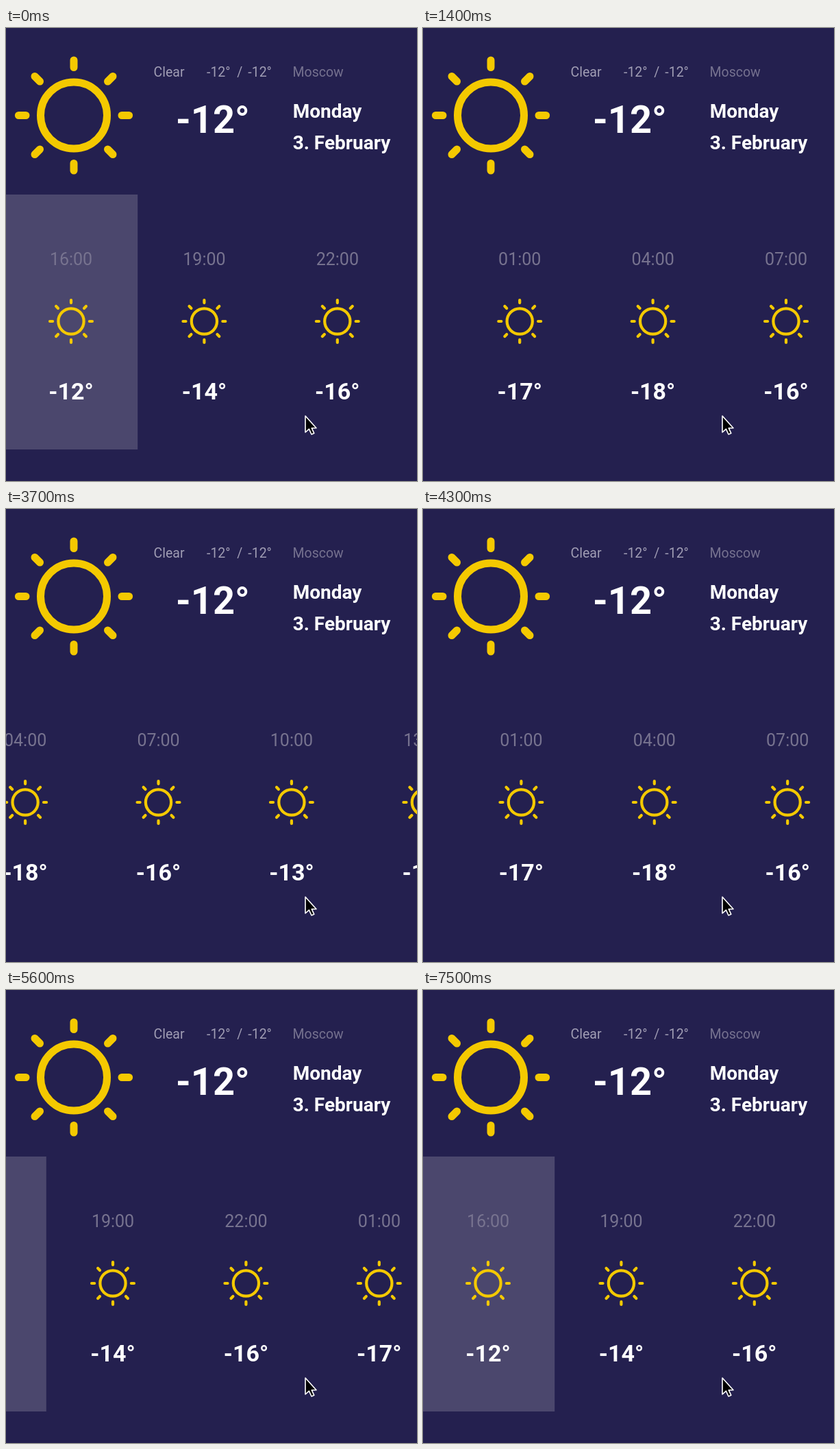
Recreate the animation shown at these times as an HTML page. Size 600 by 661 pixels, loop 7.6 s.

```html
<!DOCTYPE html>
<html lang="en">
<head>
<meta charset="utf-8">
<title>Weather</title>
<style>
  html, body { margin: 0; width: 100%; height: 100%; overflow: hidden; background: #24204f; }
  svg { display: block; width: 600px; height: 661px; font-family: Roboto, sans-serif; fill: #fff; }
  .small { font-size: 19.5px; fill: #a09db4; }
  .muted { fill: #75718f; }
  .now { font-size: 56px; font-weight: 700; }
  .date { font-size: 28px; font-weight: 700; }
  .hour { font-size: 25px; fill: #77738f; }
  .temp { font-size: 34px; font-weight: 700; }
  .mid { text-anchor: middle; }
  .sun { fill: none; stroke: #f4c900; stroke-width: 11; stroke-linecap: round; }
</style>
</head>
<body>
<svg viewBox="0 0 600 661">
  <defs>
    <g id="sun" class="sun">
      <circle r="48.5"/>
      <path id="rays"/>
    </g>
  </defs>
  <rect width="600" height="661" fill="#24204f"/>

  <use href="#sun" x="99" y="127.5"/>
  <text class="small" x="215.5" y="71">Clear</text>
  <text class="small" x="293" y="71">-12°</text>
  <text class="small" x="337.3" y="71">/</text>
  <text class="small" x="353.3" y="71">-12°</text>
  <text class="small muted" x="418.5" y="71">Moscow</text>
  <text class="now mid" x="302" y="153">-12°</text>
  <text class="date" x="418.7" y="131">Monday</text>
  <text class="date" x="418.7" y="177">3. February</text>

  <g id="list"></g>

  <path d="M437 566V590L442.4 585.2L446 593L449.8 591.3L446.3 583.8H453Z"
        fill="#000" stroke="#fff" stroke-width="1.6" stroke-linejoin="round"/>
</svg>
<script>
const LOOP = 7600, STEP = 100;
const PITCH = 194.4, FIRST = 95;
const temps = [-12, -14, -16, -17, -18, -16, -13, -12, -13];

// [time in ms, scroll offset in px]
const stops = [
  [0, 0], [400, 55], [800, 205], [1400, 537], [1900, 920], [2300, 1141.4],
  [2500, 1147.6], [2700, 1147.6], [3200, 1065], [3700, 844.5], [4200, 585],
  [4800, 307.3], [5200, 212], [5600, 133.4], [6000, 48], [6400, 0], [LOOP, 0]
];

const slope = i => (stops[i + 1][1] - stops[i][1]) / (stops[i + 1][0] - stops[i][0]);

// Harmonic mean keeps the curve from overshooting its stops.
function tangent(i) {
  if (i === 0 || i === stops.length - 1) return 0;
  const a = slope(i - 1), b = slope(i);
  return a * b > 0 ? 2 * a * b / (a + b) : 0;
}

function scrollAt(t) {
  let i = 0;
  while (t >= stops[i + 1][0]) i++;
  const [t0, p0] = stops[i], [t1, p1] = stops[i + 1];
  const h = t1 - t0, u = (t - t0) / h, v = 1 - u;
  return v * v * (1 + 2 * u) * p0 + u * u * (3 - 2 * u) * p1
    + h * u * v * (v * tangent(i) - u * tangent(i + 1));
}

const list = document.getElementById('list');

document.getElementById('rays').setAttribute('d',
  Array.from({ length: 8 }, (_, k) => {
    const c = Math.cos(k * Math.PI / 4), s = Math.sin(k * Math.PI / 4);
    return `M${70 * c} ${70 * s}L${80.6 * c} ${80.6 * s}`;
  }).join(''));

list.innerHTML = `<rect x="${FIRST - 97.2}" y="243" width="${PITCH}" height="372" fill="#4b476d"/>` +
  temps.map((temp, i) => {
    const hour = String((16 + 3 * i) % 24).padStart(2, '0');
    return `<g transform="translate(${FIRST + i * PITCH} 0)">
      <text class="hour mid" y="346">${hour}:00</text>
      <use href="#sun" transform="translate(0 428) scale(.384)"/>
      <text class="temp mid" y="542">${temp}°</text>
    </g>`;
  }).join('');

const start = performance.now();
function draw() {
  const t = Math.max(0, performance.now() - start) % LOOP;
  const x = scrollAt(Math.floor(t / STEP) * STEP);
  list.setAttribute('transform', `translate(${-x} 0)`);
  requestAnimationFrame(draw);
}
draw();
</script>
</body>
</html>
```
